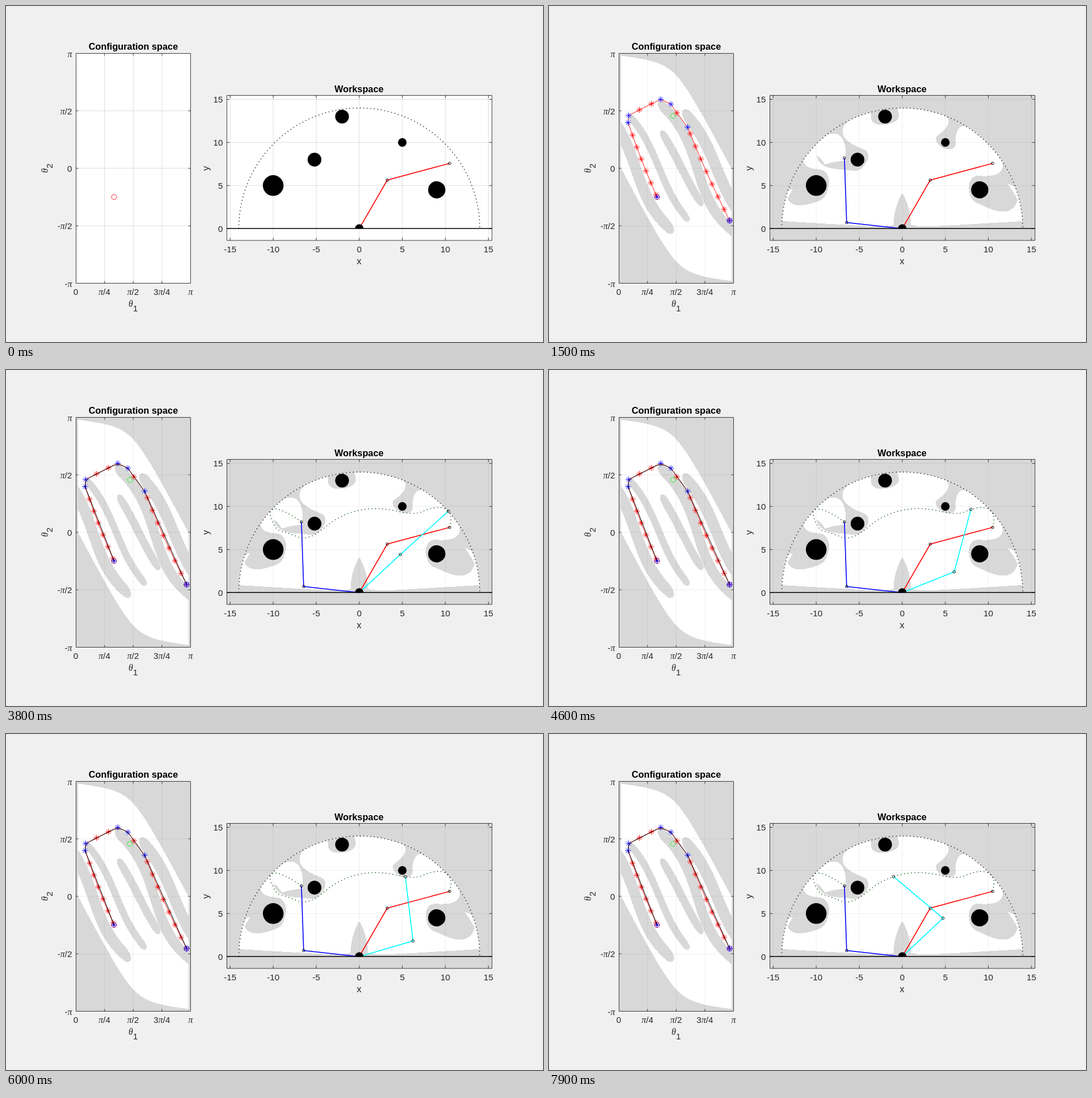
These frames come from a looping animation (947x592 px, 8000 ms). An HTML page:

```html
<!DOCTYPE html>
<html lang="en">
<head>
<meta charset="utf-8">
<title>Two-link arm planning</title>
<style>
html, body { margin: 0; width: 100%; height: 100%; overflow: hidden; background: #f0f0f0; }
svg { display: block; }
text { font: 15.2px "Liberation Sans", Arial, sans-serif; fill: #262626; }
.title { font-size: 16.3px; font-weight: bold; fill: #000; }
.label { font-size: 16.5px; }
.greek { font-family: "Liberation Serif", serif; font-style: italic; font-size: 16px; }
</style>
</head>
<body>
<svg id="stage" width="947" height="592" viewBox="0 0 947 592"></svg>
<script>
const L1 = 6.5, L2 = 7.5, REACH = L1 + L2;
const MARGIN = 0.055; // safety distance in joint angles
const discs = [[-10, 5, 1.2], [-5.2, 8, 0.8], [-2, 13, 0.8], [5, 10, 0.5], [9, 4.5, 1]];
const conf = { x: 123.5, y: 83.5, w: 202, h: 405 };
const work = { x: 389.5, y: 157.5, w: 467.5, h: 255.5 };
const RAD = 64.46, UNIT = 15.18;
const wx = x => 623 + x * UNIT, wy = y => 392.2 - y * UNIT;
const toAngles = ([x, y]) => [(x - 123) / RAD, (286 - y) / RAD];
const range = (n, f) => Array.from({ length: n }, (_, i) => f(i));
const stage = document.getElementById("stage");

function el(parent, tag, attrs, text) {
  const e = document.createElementNS("http://www.w3.org/2000/svg", tag);
  for (const k in attrs) e.setAttribute(k, attrs[k]);
  if (text) e.textContent = text;
  parent.appendChild(e);
  return e;
}
const line = (p, d, stroke, width, more) =>
  el(p, "path", { d, stroke, "stroke-width": width, fill: "none", ...more });
const ring = (p, [x, y], r, stroke) =>
  el(p, "circle", { cx: x, cy: y, r, stroke, "stroke-width": 0.9, fill: "none" });
const poly = pts => "M" + pts.map(p => p[0].toFixed(2) + " " + p[1].toFixed(2)).join("L");

// Joint positions of the arm in workspace units
function joints(a, b) {
  const x = L1 * Math.cos(a), y = L1 * Math.sin(a);
  return [x, y, x + L2 * Math.cos(a + b), y + L2 * Math.sin(a + b)];
}
function clears(a, b) {
  const [x, y, u, v] = joints(a, b);
  if (y < 0 || v < 0) return false;
  const dx = (u - x) / L2, dy = (v - y) / L2;
  for (const [cx, cy, r] of discs) {
    const s = Math.max(0, Math.min(L2, (cx - x) * dx + (cy - y) * dy));
    const ex = x + s * dx - cx, ey = y + s * dy - cy;
    if (ex * ex + ey * ey < r * r) return false;
  }
  return true;
}
const around = range(12, i => [Math.cos(i * Math.PI / 6) * MARGIN, Math.sin(i * Math.PI / 6) * MARGIN]);
const isFree = (a, b) => clears(a, b) && around.every(([da, db]) => clears(a + da, b + db));

function isReachable(x, y) {
  const c = (x * x + y * y - L1 * L1 - L2 * L2) / (2 * L1 * L2);
  if (y < 0 || Math.abs(c) > 1) return false;
  return [1, -1].some(side => {
    const b = side * Math.acos(c);
    return isFree(Math.atan2(y, x) - Math.atan2(L2 * Math.sin(b), L1 + L2 * Math.cos(b)), b);
  });
}
// Blocked pixels of a plot as horizontal runs
function shade(parent, box, ok) {
  let d = "";
  const x0 = Math.floor(box.x), x1 = Math.floor(box.x + box.w);
  for (let y = Math.floor(box.y); y < box.y + box.h; y++) {
    let start = -1;
    for (let x = x0; x <= x1; x++) {
      const bad = x < x1 && !ok(x + 0.5, y + 0.5);
      if (bad && start < 0) start = x;
      if (!bad && start >= 0) {
        d += `M${start} ${y}h${x - start}v1H${start}z`;
        start = -1;
      }
    }
  }
  el(parent, "rect", { x: box.x, y: box.y, width: box.w, height: box.h, fill: "#fff", opacity: 0.5 });
  el(parent, "path", { d, fill: "#000", opacity: 0.153, "shape-rendering": "crispEdges" });
}

const timed = [];
function from(ms) {
  const g = el(stage, "g", {});
  timed.push([ms, g]);
  return g;
}

// Plot backgrounds, grids, shading and frames
const grids = [
  [conf, range(3, i => 173.8 + i * 50.6), range(3, i => 184.7 + i * 101.3), 4],
  [work, range(7, i => wx(i * 5 - 15)), range(4, i => wy(i * 5)), 4.7]
];
for (const [b, xs, ys] of grids) {
  el(stage, "rect", { x: b.x, y: b.y, width: b.w, height: b.h, fill: "#fff" });
  line(stage, xs.map(x => `M${x} ${b.y}v${b.h}`).join("") + ys.map(y => `M${b.x} ${y}h${b.w}`).join(""),
    "#262626", 1, { opacity: 0.15 });
}
const masks = from(500);
shade(masks, conf, (x, y) => isFree(...toAngles([x, y])));
shade(masks, work, (x, y) => isReachable((x - 623) / UNIT, (392.2 - y) / UNIT));
for (const [b, xs, ys, n] of grids) {
  const right = b.x + b.w, bottom = b.y + b.h;
  line(stage, `M${b.x} ${b.y}h${b.w}v${b.h}h${-b.w}z` +
    xs.map(x => `M${x} ${b.y}v${n}M${x} ${bottom}v${-n}`).join("") +
    ys.map(y => `M${b.x} ${y}h${n}M${right} ${y}h${-n}`).join(""), "#262626", 0.9);
}

// Labels
function label(x, y, str, anchor, cls) {
  const t = el(stage, "text", { x, y, "text-anchor": anchor, class: cls || "" });
  for (const part of str.split(/(π)/)) {
    if (part) el(t, "tspan", part === "π" ? { class: "greek" } : {}, part);
  }
  return t;
}
label(224.5, 77, "Configuration space", "middle", "title");
label(622.5, 152, "Workspace", "middle", "title");
["0", "π/4", "π/2", "3π/4", "π"].forEach((s, i) => label(123 + i * 50.6, 509, s, "middle"));
["π", "π/2", "0", "-π/2", "-π"].forEach((s, i) => label(116.5, 89.5 + i * 101.3, s, "end"));
for (let v = -15; v <= 15; v += 5) {
  label(wx(v), 434, String(v), "middle");
  if (v >= 0) label(382.5, wy(v) + 5.6, String(v), "end");
}
label(622.5, 455, "x", "middle", "label");
label(0, 0, "y", "middle", "label").setAttribute("transform", "translate(357.5 286) rotate(-90)");
function theta(n, place) {
  const g = el(stage, "g", { transform: place });
  el(g, "text", { class: "greek", x: 0, y: 0 }, "θ");
  el(g, "text", { x: 8, y: 8 }, n);
}
theta("1", "translate(216 530)");
theta("2", "translate(74 294) rotate(-90)");

function armPoints(a, b) {
  const [x, y, u, v] = joints(a, b);
  return [[wx(0), wy(0)], [wx(x), wy(y)], [wx(u), wy(v)]];
}
function makeArm(parent, color) {
  const bar = line(parent, "", color, 1.6);
  const pins = [1, 2].map(() => ring(parent, [0, 0], 2.3, "#000"));
  return (a, b) => {
    const pts = armPoints(a, b);
    bar.setAttribute("d", poly(pts));
    pins.forEach((p, i) => {
      p.setAttribute("cx", pts[i + 1][0]);
      p.setAttribute("cy", pts[i + 1][1]);
    });
  };
}

// Route through the via points, with corners rounded by parabolas
const via = [[190.5, 336.5], [139.5, 205.5], [140.5, 193], [197, 164.5], [215, 173], [244.5, 213.5], [318.5, 378]];
const start = via[0], goal = via[via.length - 1];
const dist = (p, q) => Math.hypot(q[0] - p[0], q[1] - p[1]);
const mix = (p, q, k) => [p[0] + (q[0] - p[0]) * k, p[1] + (q[1] - p[1]) * k];
const curve = [start];
for (let i = 1; i < via.length - 1; i++) {
  const p = via[i];
  const [m, n] = [via[i - 1], via[i + 1]].map(q => mix(p, q, Math.min(0.5, 10 / dist(p, q))));
  for (let k = 0; k <= 1; k += 0.125) curve.push(mix(mix(m, p, k), mix(p, n, k), k));
}
curve.push(goal);
const length = curve.reduce((sum, p, i) => i ? sum + dist(curve[i - 1], p) : 0, 0);
function along(s) {
  let i = 1;
  for (let d; i < curve.length - 1 && s > (d = dist(curve[i - 1], curve[i])); i++) s -= d;
  const d = dist(curve[i - 1], curve[i]);
  return d ? mix(curve[i - 1], curve[i], s / d) : curve[i];
}

// Sampled nodes on each leg: count, first place, spacing
const legs = [[6, 0.03, 0.16], [0], [2, 0.35, 0.37], [0], [1, 0.38, 0], [7, 0.07, 0.135]];
const nodes = legs.map(([count, first, gap], i) => range(count, j => {
  const k = first + j * gap, [x, y] = mix(via[i], via[i + 1], k);
  return [x - 0.013 * dist(via[i], via[i + 1]) * Math.sin(k * Math.PI), y];
}));
const rough = via.flatMap((p, i) => [p, ...(nodes[i] || [])]);
const star = ([x, y]) => `M${x - 5.3} ${y}h10.6M${x} ${y - 5.3}v10.6M${x - 3.8} ${y - 3.8}l7.6 7.6m0 -7.6l-7.6 7.6`;
const dots = { "stroke-dasharray": "1.4 4.8" };

makeArm(stage, "#f00")(Math.PI / 3, -Math.PI / 4);
ring(stage, start, 4.4, "#f00");

const goals = from(1000);
ring(goals, [218.5, 193.5], 4.4, "#0f0");
ring(goals, goal, 4.4, "#00f");

const plan = from(1500);
line(plan, poly(rough), "#f00", 0.9);
line(plan, [...nodes.flat(), goal].map(star).join(""), "#f00", 0.9);
line(plan, via.map(star).join(""), "#00f", 0.9);
makeArm(plan, "#00f")(...toAngles(goal));

const trail = from(2000);
line(trail, poly(curve), "#000", 1);
line(trail, poly(range(Math.ceil(length), s => armPoints(...toAngles(along(s)))[2])), "#004800", 1.4, dots);

const setMover = makeArm(from(2500), "#0ff");

// Reach limit, obstacles and ground lie on top
const R = REACH * UNIT;
line(stage, `M${623 - R} ${wy(0)}a${R} ${R} 0 0 1 ${2 * R} 0`, "#000", 1.4, dots);
for (const [x, y, r] of discs) el(stage, "circle", { cx: wx(x), cy: wy(y), r: r * UNIT });
el(stage, "path", { d: "M615.4 392.2a7.6 7.6 0 0 1 15.2 0z" });
line(stage, `M${work.x} 392h${work.w}`, "#000", 1.7);

// Smooth run to the first corner, then a slow speeding-up
function travel(n) {
  const u = Math.min(1, n / 30), m = Math.max(0, n - 24);
  return 141.5 * u * u * u * (10 - 15 * u + 6 * u * u) + 0.45 * m + 0.035 * m * m;
}
function draw(ms) {
  for (const [t, g] of timed) g.setAttribute("visibility", ms >= t ? "visible" : "hidden");
  const step = Math.max(0, Math.floor((ms - 2500) / 100 + 1e-6));
  setMover(...toAngles(along(travel(step))));
}
const began = performance.now();
function tick() {
  draw((performance.now() - began) % 8000);
  requestAnimationFrame(tick);
}
tick();
</script>
</body>
</html>
```
